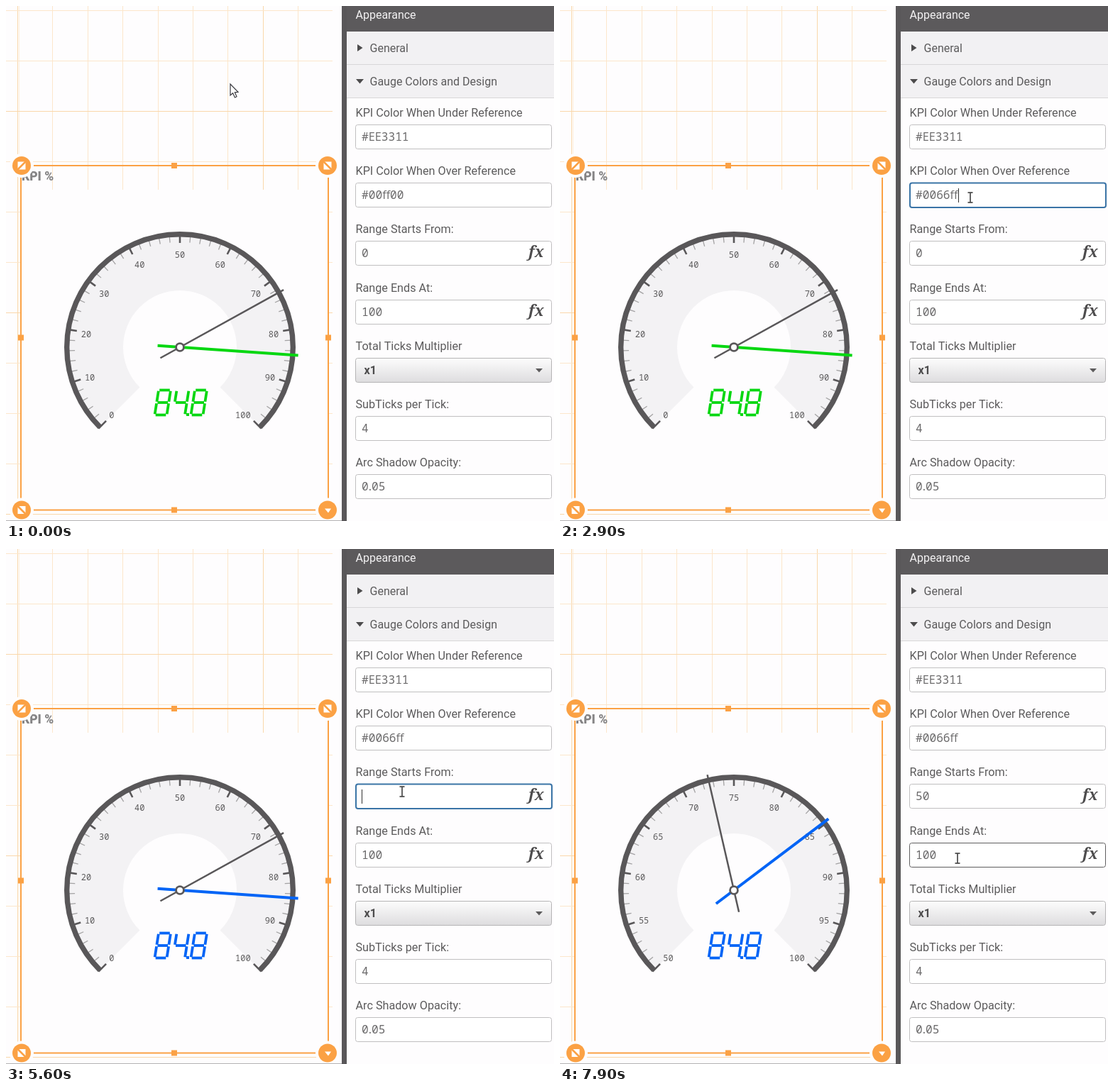
These frames come from a looping animation (772x726 px, 8 s). An HTML page with a canvas:

```html
<!DOCTYPE html>
<html lang="en">
<head>
<meta charset="utf-8">
<title>Gauge settings</title>
<style>
html, body { margin: 0; width: 100%; height: 100%; overflow: hidden; background: #fefdfe; }
canvas { display: block; }
</style>
</head>
<body>
<canvas id="stage" width="772" height="726"></canvas>
<script>
const ctx = document.getElementById('stage').getContext('2d');
const LOOP = 8000;
const DARK = '#595759', TEXT = '#5c5b5c', ORANGE = '#fba144', PAPER = '#fefdfe';
const SANS = 'Roboto, sans-serif', MONO = '"Noto Sans Mono", monospace';
const CX = 245, CY = 481;
const rad = deg => deg * Math.PI / 180;
const fieldTop = i => Math.round(167 + i * 82.2);

// Each entry: time from which the value holds, value.
const overText = [
  [0, '#00ff00'], [1600, '#00ff0'], [1700, '#00ff'], [1800, '#00f'], [1900, '#00'],
  [2200, '#006'], [2350, '#0066'], [2600, '#0066f'], [2750, '#0066ff']
];
const startText = [[0, '0'], [5200, ''], [6100, '5'], [6300, '50']];
const focusField = [[0, -1], [1000, 1], [3500, -1], [4700, 2], [7200, -1]];
const mousePath = [
  [0, 316, 110], [300, 316, 110], [900, 578, 270], [3800, 578, 270],
  [4100, 566, 327], [4400, 558, 342], [7400, 558, 342], [7750, 560, 436], [8000, 560, 436]
];

function held(steps, t) {
  let value = steps[0][1];
  for (const [at, v] of steps) if (t >= at) value = v;
  return value;
}

function mouseAt(t) {
  const i = Math.max(1, mousePath.findIndex(p => p[0] > t));
  const [t0, x0, y0] = mousePath[i - 1], [t1, x1, y1] = mousePath[i];
  const u = (t - t0) / (t1 - t0), e = u * u * (3 - 2 * u);
  return [x0 + (x1 - x0) * e, y0 + (y1 - y0) * e];
}

function rect(x, y, w, h, color) {
  ctx.fillStyle = color;
  ctx.fillRect(x, y, w, h);
}

function line(x0, y0, x1, y1, color, width) {
  ctx.strokeStyle = color;
  ctx.lineWidth = width;
  ctx.beginPath();
  ctx.moveTo(x0, y0);
  ctx.lineTo(x1, y1);
  ctx.stroke();
}

function poly(points, fill) {
  ctx.beginPath();
  points.forEach(([x, y]) => ctx.lineTo(x, y));
  ctx.closePath();
  ctx.fillStyle = fill;
  ctx.fill();
}

function disc(x, y, r, color) {
  ctx.beginPath();
  ctx.arc(x, y, r, 0, 7);
  ctx.fillStyle = color;
  ctx.fill();
}

function write(str, x, y, font, color = TEXT, align = 'left') {
  ctx.font = font;
  ctx.fillStyle = color;
  ctx.textAlign = align;
  ctx.fillText(str, x, y);
}

// Digits are monospaced, letters proportional; returns the end x.
function writeValue(str, x, y) {
  for (const run of str.match(/[#\d]+|[^#\d]+/g) || []) {
    write(run, x, y, /\d|#/.test(run) ? '16.2px ' + MONO : '16.2px "Open Sans", sans-serif', '#6a696a');
    x += ctx.measureText(run).width;
  }
  return x;
}

// Polar line around the gauge centre, angle in degrees clockwise from top.
function spoke(deg, r0, r1, color, width) {
  const s = Math.sin(rad(deg)), c = Math.cos(rad(deg));
  line(CX + r0 * s, CY - r0 * c, CX + r1 * s, CY - r1 * c, color, width);
}

function drawGrid() {
  const faint = '#fce6cb', strong = '#fad7aa';
  rect(0, 0, 772, 726, PAPER);
  for (let i = 0; i < 9; i++) {
    rect(Math.round(16 + i * 49.4), 0, 1, i ? 259 : 726, i % 7 ? faint : strong);
  }
  rect(18, 0, 1, 726, '#fdefdd');
  for (let i = 0; i < 11; i++) rect(0, 6 + i * 71, 460, 1, i % 4 === 2 ? strong : faint);
  rect(22, 259, 431, 450, PAPER);
}

function drawCorner(x, y, slash) {
  disc(x, y, 17, PAPER);
  disc(x, y, 13, ORANGE);
  if (!slash) {
    poly([[x - 4, y - 2], [x + 5, y - 2], [x + 1, y + 4]], '#fff');
    return;
  }
  rect(x - 5.5, y - 5.5, 11, 11, '#fff');
  line(x - 6, y + 6 * slash, x + 6, y - 6 * slash, ORANGE, 2.5);
}

function drawSelection() {
  write('KPI %', 22, 246, '900 17.5px ' + SANS, '#858485');
  ctx.strokeStyle = ORANGE;
  ctx.lineWidth = 2;
  ctx.strokeRect(21, 225, 433, 485.5);
  for (const [x, y] of [[237, 225], [237, 710.5], [21, 467.5], [454, 467.5]]) rect(x - 4, y - 4, 8, 8, ORANGE);
  drawCorner(22, 225, 1);
  drawCorner(453, 225, -1);
  drawCorner(22, 710.5, -1);
  drawCorner(453, 710.5, 0);
}

// Segments as unit coordinates, ordered a to g.
const SEGMENTS = [
  [0, 0, 1, 0], [1, 0, 1, .5], [1, .5, 1, 1], [0, 1, 1, 1],
  [0, .5, 0, 1], [0, 0, 0, .5], [0, .5, 1, .5]
];

function drawDigit(x, lit, color) {
  const w = 17, h = 35, top = 541.5, slant = 5.5;
  for (const i of lit) {
    const [ax, ay, bx, by] = SEGMENTS[i];
    const gx = ax === bx ? 0 : 1.2 / w, gy = ay === by ? 0 : 1.2 / h;
    const px = (u, v) => x + u * w + (1 - v) * slant;
    line(px(ax + gx, ay + gy), top + (ay + gy) * h, px(bx - gx, by - gy), top + (by - gy) * h, color, 3.8);
  }
}

function drawGauge(min, color) {
  const angle = v => (v - min) / (100 - min) * 270 - 135;
  const from = rad(135), to = rad(405);

  ctx.beginPath();
  ctx.arc(CX, CY, 160, from, to);
  ctx.arc(CX, CY, 80, to, from, true);
  ctx.fillStyle = '#f3f2f4';
  ctx.fill();

  for (let i = 0; i <= 50; i++) {
    const deg = -135 + i * 5.4;
    if (i % 5) spoke(deg, 148, 157, '#a3a2a3', 1.3);
    else spoke(deg, 147, 162, DARK, 2.6);
  }

  ctx.beginPath();
  ctx.arc(CX, CY, 159.3, from, to);
  ctx.strokeStyle = DARK;
  ctx.lineWidth = 7.4;
  ctx.stroke();

  for (let i = 0; i <= 10; i++) {
    const a = rad(-135 + i * 27);
    const align = i < 5 ? 'left' : i > 5 ? 'right' : 'center';
    write(min + (100 - min) * i / 10, CX + 141 * Math.sin(a), 487.5 - 132.5 * Math.cos(a), '12px ' + MONO, TEXT, align);
  }

  drawDigit(209.5, [0, 1, 2, 3, 4, 5, 6], color);
  drawDigit(235, [1, 2, 5, 6], color);
  rect(254, 574, 4, 4, color);
  drawDigit(260.5, [0, 1, 2, 3, 4, 5, 6], color);

  spoke(angle(84.8), -31.5, 167, color, 4);
  spoke(angle(72.6), -31.5, 167, DARK, 2.5);
  disc(CX, CY, 6.8, DARK);
  disc(CX, CY, 4, '#fff');
}

function box(x, y, w, h, border, width, fill) {
  ctx.beginPath();
  ctx.roundRect(x, y, w, h, 3);
  ctx.fillStyle = fill;
  ctx.fill();
  ctx.strokeStyle = border;
  ctx.lineWidth = width;
  ctx.stroke();
}

function squiggle(x0, x1, y) {
  ctx.beginPath();
  for (let x = x0; x <= x1; x += 2) ctx.lineTo(x, y + (x - x0) / 2 % 2 * 2);
  ctx.strokeStyle = '#e0814f';
  ctx.lineWidth = 1;
  ctx.stroke();
}

const LABELS = [
  'KPI Color When Under Reference', 'KPI Color When Over Reference', 'Range Starts From:',
  'Range Ends At:', 'Total Ticks Multiplier', 'SubTicks per Tick:', 'Arc Shadow Opacity:'
];

function drawField(i, value, focused, hovered, t) {
  const top = fieldTop(i);
  write(LABELS[i], 492.5, top - 11.5, '16.2px ' + SANS);
  if (i === 4) {
    const g = ctx.createLinearGradient(0, top, 0, top + 34);
    g.addColorStop(0, '#fdfdfd');
    g.addColorStop(1, '#dedddf');
    box(492.5, top + .5, 276, 34, '#b5b4b5', 1, g);
    write(value, 504.5, top + 23, 'bold 16.2px ' + SANS, '#4d4c4d');
    poly([[746, top + 15], [756, top + 15], [751, top + 20.5]], TEXT);
    return;
  }
  if (focused) box(493, top + .5, 276, 34.5, '#3a74a6', 2, '#fff');
  else box(492.5, top + .5, 276, 34, hovered ? '#5f5e5f' : '#c0bfc0', 1, '#fff');
  const end = writeValue(value, 501, top + 23);
  if (focused) rect(Math.round(end), top + 8, 1, 20, '#333');
  if (focused && i === 1 && t < 1600) squiggle(511, 560, top + 26);
  if (i === 2 || i === 3) write('fx', 736, top + 23, 'italic 900 21.5px "Noto Serif", serif', '#4d4c4d');
}

function drawPanel(t, mouse) {
  rect(473, 0, 7, 726, DARK);
  rect(480, 0, 292, 726, PAPER);
  rect(480, 0, 292, 36, '#5c5a5c');
  write('Appearance', 492.5, 18, '16px ' + SANS, '#f4f3f4');
  rect(480, 36, 292, 94, '#f2f1f3');
  rect(480, 82, 292, 1, '#d8d7d8');
  rect(480, 129, 292, 1, '#d8d7d8');
  poly([[495, 54], [502.5, 59], [495, 64]], '#4d4c4d');
  poly([[493, 103], [504, 103], [498.5, 109.5]], '#4d4c4d');
  write('General', 512.5, 65, '16px ' + SANS);
  write('Gauge Colors and Design', 512.5, 112, '16px ' + SANS);

  const values = ['#EE3311', held(overText, t), held(startText, t), '100', 'x1', '4', '0.05'];
  const focus = held(focusField, t);
  values.forEach((value, i) => {
    const top = fieldTop(i);
    // The border lags a little behind the pointer.
    const [x, y] = i === 1 && t > 3500 && t < 4200 ? [578, 270] : mouse;
    const hovered = x > 492 && y >= top && y <= top + 35;
    drawField(i, value, focus === i, hovered, t);
  });
}

function drawMouse([x, y]) {
  if (x > 492 && y > 130) {
    line(x, y - 6.5, x, y + 6.5, '#222', 1.4);
    for (const s of [-1, 1]) line(x - 3.5, y + 7 * s, x + 3.5, y + 7 * s, '#222', 1.4);
    return;
  }
  const shape = [[0, 0], [0, 16], [3.6, 12.8], [6.4, 19], [9, 17.8], [6.3, 11.8], [11, 11.3]];
  poly(shape.map(([a, b]) => [x + a, y + b]), '#fff');
  ctx.strokeStyle = '#3a3a40';
  ctx.lineWidth = 1.2;
  ctx.stroke();
}

function draw(t) {
  const mouse = mouseAt(t);
  drawGrid();
  drawGauge(t < 7250 ? 0 : 50, t < 3600 ? '#05d711' : '#0064f6');
  drawSelection();
  rect(0, 725, 473, 1, '#b4b3b4');
  drawPanel(t, mouse);
  drawMouse(mouse);
}

function tick(now) {
  draw(now % LOOP);
  requestAnimationFrame(tick);
}
requestAnimationFrame(tick);
</script>
</body>
</html>
```
